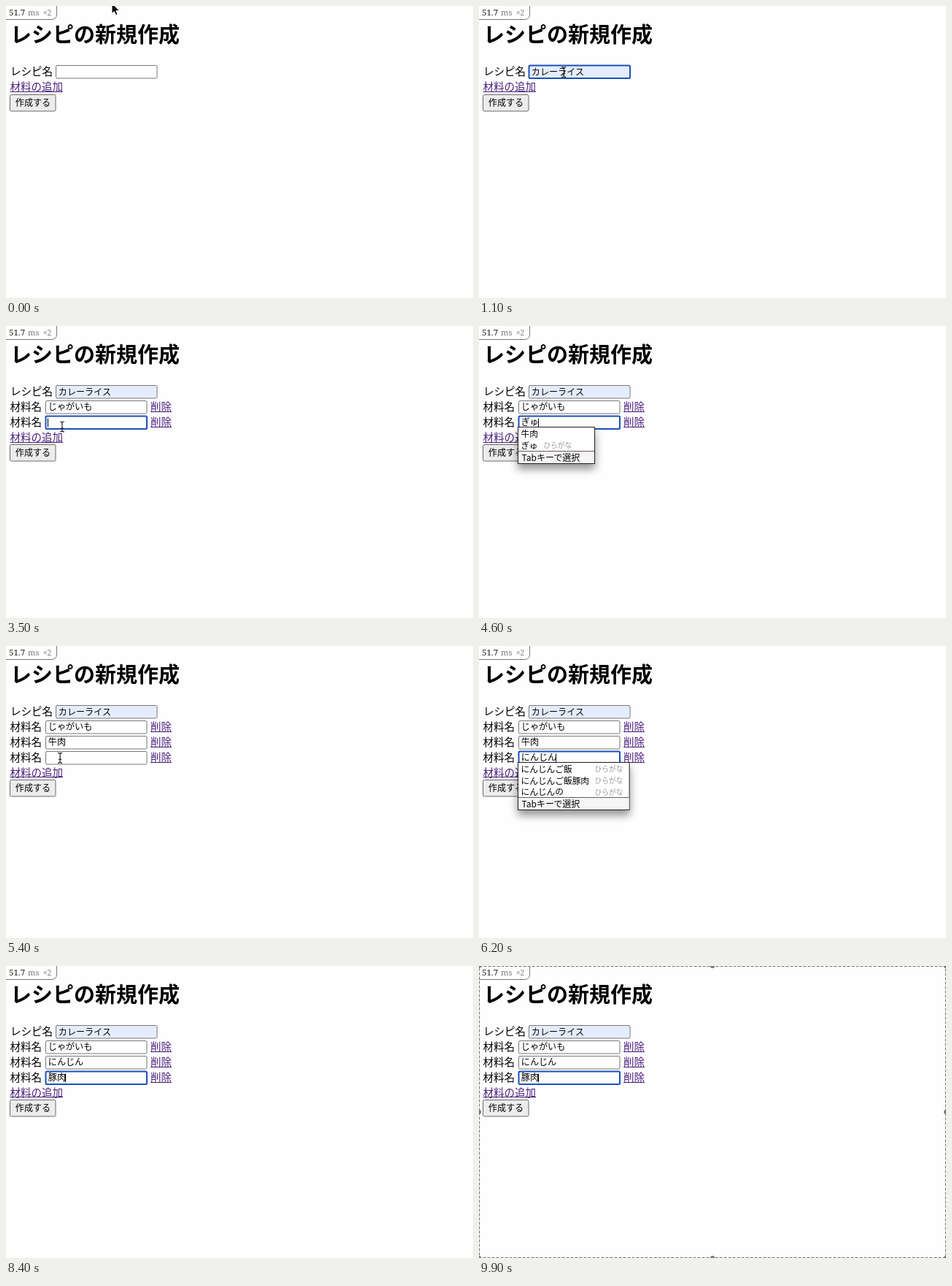
Write an HTML page that moves like this. It is 640 by 400 pixels and loops after 10000 ms.

```html
<!DOCTYPE html>
<html lang="ja">
<head>
<meta charset="utf-8">
<title>レシピの新規作成</title>
<style>
html, body { margin: 0; width: 100%; height: 100%; overflow: hidden; background: #fefefe; }
svg { display: block; width: 640px; height: 400px; font-family: "Noto Sans CJK JP", "Noto Sans CJK", sans-serif; }
#form { font-weight: 500; }
.badge { font-family: "Noto Serif", serif; }
</style>
</head>
<body>
<svg id="stage" viewBox="0 0 640 400">
  <defs>
    <filter id="shadow" x="-30%" y="-30%" width="160%" height="190%">
      <feDropShadow dx="0" dy="7" stdDeviation="6" flood-color="#000" flood-opacity=".42"/>
    </filter>
  </defs>
  <text x="6" y="50" font-size="29" font-weight="700">レシピの新規作成</text>
  <g id="form"></g>
  <g class="badge">
    <path d="M-1 -1H69.5V11Q69.5 18.5 62 18.5H-1Z" fill="#fff" stroke="#777"/>
    <text x="4" y="13" font-size="11.5" fill="#222">51.7</text>
    <text x="30" y="13" font-size="11" fill="#777">ms</text>
    <text x="51" y="13" font-size="10" fill="#777">×2</text>
  </g>
  <g id="pointer"></g>
  <g id="selection" fill="#777">
    <rect x=".5" y=".5" width="639" height="399" fill="none" stroke="#777" stroke-dasharray="4 2"/>
    <circle cx="320" cy="0" r="3"/><circle cx="320" cy="400" r="3"/>
    <circle cx="0" cy="200" r="3"/><circle cx="640" cy="200" r="3"/>
    <circle cx="0" cy="0" r="3"/><circle cx="640" cy="0" r="3"/>
    <circle cx="0" cy="400" r="3"/><circle cx="640" cy="400" r="3"/>
  </g>
</svg>
<script>
const LOOP = 10000;
const ROW = 20.8;
const KANA = 'ひらがな';
const byId = id => document.getElementById(id);
const rowY = i => 90.2 + ROW * i;

// Each step: start time, ingredient values, focused row (0 = recipe name), suggestions.
const POTATO = 'じゃがいも', BEEF = '牛肉', CARROT = 'にんじん', PORK = '豚肉';
const steps = [
  [0, [], -1],
  [600, [], 0],
  [1700, [''], -1],
  [2200, [''], 1],
  [2400, ['じ'], 1, [POTATO, '時間', '=じ']],
  [2500, ['じゃ'], 1, [POTATO, 'じゃあ', '=じゃ']],
  [2600, ['じゃが'], 1, [POTATO, 'ジャガイモ', '=じゃが']],
  [2700, [POTATO], 1, [POTATO, 'ジャガイモ', '=じゃがいも']],
  [2850, [POTATO], 1],
  [3200, [POTATO, ''], -1],
  [3400, [POTATO, ''], 2],
  [4000, [POTATO, 'g'], 2, [BEEF, '牛乳', '=g']],
  [4200, [POTATO, 'ぎ'], 2, [BEEF, '牛乳', '=ぎ']],
  [4500, [POTATO, 'ぎゅ'], 2, [BEEF, '=ぎゅ']],
  [4700, [POTATO, 'ぎゅう'], 2, [BEEF, '=ぎゅう']],
  [4900, [POTATO, BEEF], 2],
  [5350, [POTATO, BEEF, ''], -1],
  [5600, [POTATO, BEEF, ''], 3],
  [5800, [POTATO, BEEF, 'に'], 3, [CARROT, '=に', '=にんじんの']],
  [5950, [POTATO, BEEF, 'にん'], 3, [CARROT, '=にん', '=にんじんの']],
  [6100, [POTATO, BEEF, CARROT], 3, ['=にんじんご飯', '=にんじんご飯豚肉', '=にんじんの']],
  [6300, [POTATO, CARROT, ''].map((v, i) => [POTATO, BEEF, CARROT][i]), 3],
  [6850, [POTATO, CARROT], -1],
  [7300, [POTATO, CARROT, ''], -1],
  [7500, [POTATO, CARROT, ''], 3],
  [7700, [POTATO, CARROT, 'ぶ'], 3, [PORK, '部', '=ぶ']],
  [7850, [POTATO, CARROT, 'ぶた'], 3, [PORK, '豚', '=ぶた']],
  [8000, [POTATO, CARROT, 'ぶたに'], 3, [PORK, '=ぶたに', '=ぶたにく']],
  [8100, [POTATO, CARROT, 'ぶたにく'], 3, [PORK, 'ブタニク', '=ぶたにく']],
  [8300, [POTATO, CARROT, PORK], 3]
];

// Pointer track: time, x, y, shape held until the next entry.
const track = [
  [0, 145, -4, 'arrow'], [100, 145, -4, 'arrow'], [450, 125, 85, 'beam'],
  [900, 118, 90, 'beam'], [1250, 115, 91, 'arrow'], [1550, 74, 109, 'hand'],
  [1700, 74, 110, 'beam'], [2000, 76, 111, 'beam'], [2200, 86, 115, 'beam'],
  [2400, 86, 115, ''], [2850, 86, 115, 'arrow'], [3050, 75, 132, 'hand'],
  [3200, 75, 133, 'beam'], [3400, 77, 138, 'beam'], [4000, 77, 138, ''],
  [4950, 77, 138, 'arrow'], [5150, 74, 153, 'hand'], [5350, 74, 153, 'beam'],
  [5600, 75, 156, 'beam'], [5800, 75, 156, ''], [6400, 75, 156, 'arrow'],
  [6700, 212, 133, 'hand'], [6900, 212, 133, 'arrow'], [7150, 72, 153, 'hand'],
  [7300, 72, 153, 'beam'], [7500, 75, 156, 'beam'], [7700, 75, 156, '']
];

const shapes = {
  arrow: '<path d="M0 0V14.5L3.3 11.5L5.6 16.5L8 15.4L5.8 10.5H10.4Z" fill="#000" stroke="#fff"/>',
  beam: '<path d="M-3 -7Q0 -7 0 -5Q0 -7 3 -7M0 -5V5M-3 7Q0 7 0 5Q0 7 3 7M-2 2H2" fill="none" stroke="#222" stroke-width="1.2"/>',
  hand: '<path d="M-1 -1Q0 -2 1 -1V5L6 6Q8 7 7 10L5 15H-1L-5 9Q-5 7 -3 8L-1 10Z" fill="#fff" stroke="#000"/>'
};

const lastBefore = (list, t) => list.filter(k => k[0] <= t).pop();

const label = (x, cy, size, str, fill = '#000') =>
  `<text x="${x}" y="${cy + size * .36}" font-size="${size}" fill="${fill}">${str}</text>`;

const link = (x, cy, str) => label(x, cy, 14.5, str, '#4b1f7e') +
  `<path d="M${x} ${Math.round(cy + 6) + .5}h${str.length * 14.5}" stroke="#4b1f7e"/>`;

function field(x, cy, value, focused, fill, caret) {
  const top = Math.round(cy - 9) + .5;
  const edge = focused ? 'stroke="#1b50b8" stroke-width="2"' : 'stroke="#767676"';
  const caretX = Math.floor(x + 3 + value.length * 12.1) + .5;
  return `<rect x="${x + .5}" y="${top}" width="138.5" height="17.5" rx="1.5" fill="${fill}" ${edge}/>` +
    label(x + 3.8, cy, 12.1, value) +
    (focused && caret ? `<path d="M${caretX} ${top + 3}v12" stroke="#000"/>` : '');
}

function suggestions(cy, items) {
  const top = Math.round(cy + 6.5) + .5;
  const words = items.map(s => s.replace('=', ''));
  const noteX = 65 + 11.7 * Math.max(...words.map(w => w.length));
  const width = Math.max(158.5, noteX + 47.5) - 53.5;
  const rule = Math.round(top + 1 + 15.6 * items.length) + .5;
  return `<rect x="53.5" y="${top}" width="${width}" height="${rule + 17 - top}" fill="#fff" stroke="#222" filter="url(#shadow)"/>` +
    `<rect x="54" y="${rule}" width="${width - 1}" height="16.5" fill="#f5f5f5"/>` +
    items.map((s, i) => {
      const y = top + 9.5 + 15.6 * i;
      return label(57.5, y, 11.7, words[i]) + (s[0] === '=' ? label(noteX, y, 9.7, KANA, '#999') : '');
    }).join('') +
    `<path d="M54 ${rule}h${width - 1}" stroke="#69566b"/>` +
    label(58.5, rule + 9, 12, 'Tabキーで選択');
}

function formMarkup(t) {
  const [, rows, focus, menu] = lastBefore(steps, t);
  const blinkOn = t % 1000 >= 390 && t % 1000 < 930;
  const caret = menu || blinkOn;
  const filled = t >= 1000;
  const linkY = rowY(rows.length + 1);
  const buttonY = linkY + 21.2;
  return label(6, rowY(0), 14.5, 'レシピ名') +
    field(68, rowY(0), filled ? 'カレーライス' : '', focus === 0, filled ? '#e5edfc' : '#fff', caret) +
    rows.map((value, i) => {
      const y = rowY(i + 1);
      return label(5.5, y, 14.5, '材料名') +
        field(54, y, value, focus === i + 1, '#fff', caret) + link(198, y, '削除');
    }).join('') +
    link(5.5, linkY, '材料の追加') +
    `<rect x="5.5" y="${Math.round(buttonY - 11.5) + .5}" width="62.5" height="22.5" rx="2" fill="#ececec" stroke="#6b6b6b"/>` +
    label(12.8, buttonY, 12.1, '作成する') +
    (menu ? suggestions(rowY(focus), menu) : '');
}

function pointerMarkup(t) {
  const from = lastBefore(track, t);
  const to = track[track.indexOf(from) + 1] || from;
  const p = to === from ? 0 : (t - from[0]) / (to[0] - from[0]);
  const ease = p * p * (3 - 2 * p);
  const at = i => from[i] + (to[i] - from[i]) * ease;
  return from[3] ? `<g transform="translate(${at(1)} ${at(2)})">${shapes[from[3]]}</g>` : '';
}

let lastForm = '';
function draw(t) {
  const markup = formMarkup(t);
  if (markup !== lastForm) byId('form').innerHTML = lastForm = markup;
  byId('pointer').innerHTML = pointerMarkup(t);
  byId('selection').setAttribute('opacity', Math.min(1, Math.max(0, (t - 9500) / 200)));
}

const start = performance.now();
function tick() {
  draw((performance.now() - start) % LOOP);
  requestAnimationFrame(tick);
}
tick();
</script>
</body>
</html>
```
